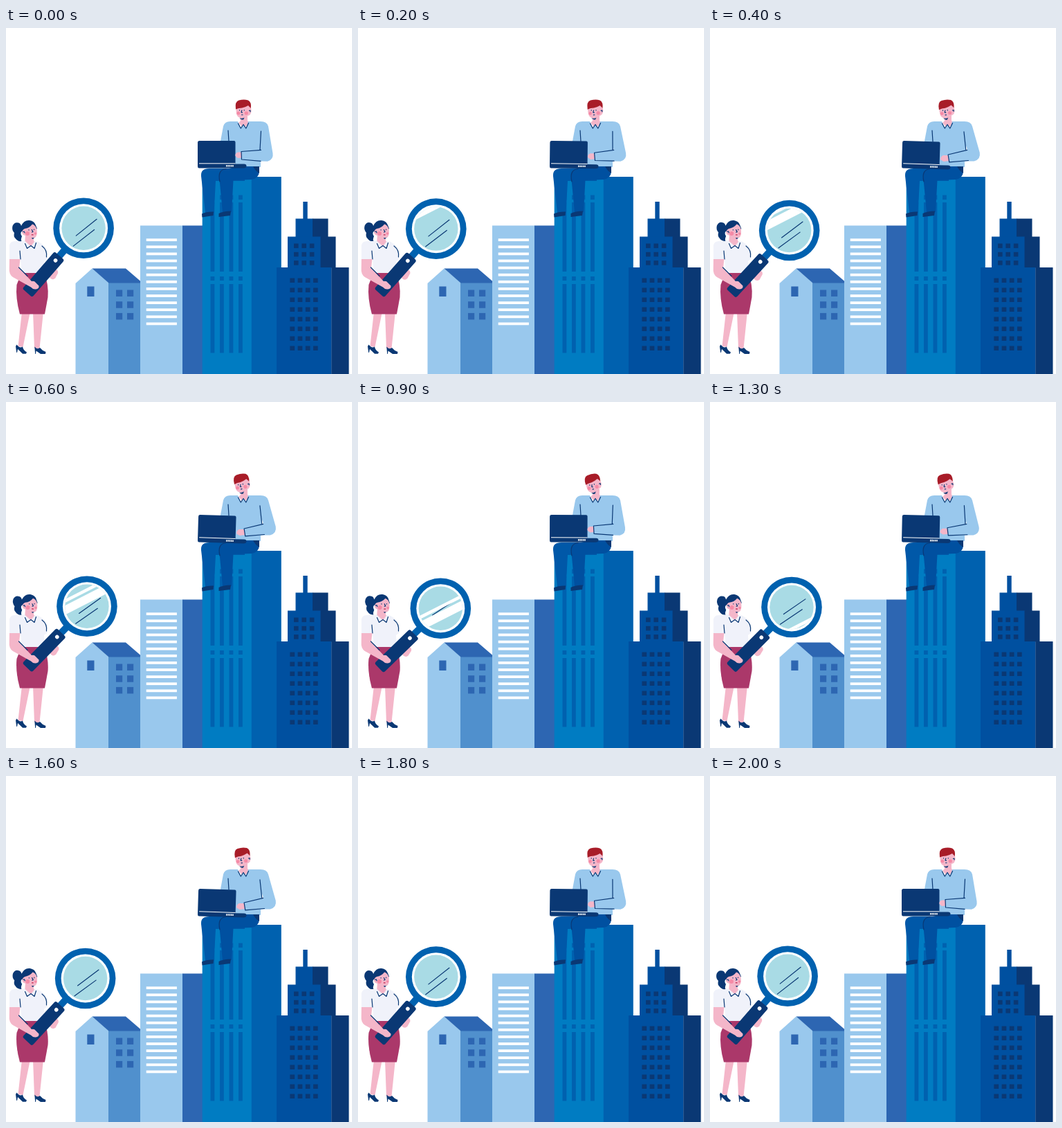
Recreate the animation shown at these times as an HTML page. Size 500 by 500 pixels, loop 6.1 s.

```html
<!DOCTYPE html>
<html lang="en">
<head>
<meta charset="utf-8">
<title>City search</title>
<style>
  html, body { margin: 0; width: 100%; height: 100%; overflow: hidden; background: #fff; }
  svg { display: block; width: 100vw; height: 100vh; }
  .navy { fill: #0a3874 } .deep { fill: #0050a0 } .blue { fill: #0061af } .azure { fill: #007cc2 }
  .mid { fill: #2d66b2 } .side { fill: #5090cd } .sky { fill: #99c8ed } .white { fill: #fff }
  .skin { fill: #f4b6c9 } .blush { fill: #f58aa6 } .line { fill: none; stroke: #0a3874; stroke-width: 1.2; stroke-linecap: round; stroke-linejoin: round }
</style>
</head>
<body>
<svg viewBox="0 0 500 500">
  <defs><clipPath id="lens"><circle r="31.7"/></clipPath></defs>
  <g id="city"></g>

  <g id="man">
    <path class="skin" d="M338 126H349V134L352 137L343 145L336 137L339 134Z"/>
    <path class="sky" d="M309.500 166L314 142Q316 135 324 135H335L339 144.500L343 139L347 144.500L350 135H368Q377 135 379 142L368 180V201H322V166Z"/>
    <path class="line" d="M335.500 138L339.300 145L343 139.500L346.800 145L350.500 137.500M321 148L322 164"/>
    <path fill="#0058a8" d="M345 203H294Q281 203 282 214L288 267H300.500L303 221H345Z"/>
    <path class="deep" d="M366 200H335L322 203Q307 204 308 214L313 266H326L328.500 220L355 219Q365.500 217 366 207Z"/>
    <path class="line" d="M309 222Q305 205 318 203.500"/>
    <path class="navy" d="M357 200H366V210Q360 206 357 200ZM283 268.500Q290 265 300 265.500L299.500 271L283.500 273.500ZM307.500 268Q314 264.500 325 264.500L324 271L307.500 273Z"/>
    <g id="manHead">
      <path class="skin" d="M332.500 114Q332 125 335 128Q339 131.500 344 130.500L349 127Q354.500 126 354.500 119Q354 112 349 109H336Z"/>
      <path fill="#a81c28" d="M332 117.500Q330.500 106 336.500 104.500Q344 102.500 350 104.500Q355 107 353.800 116L350 112Q346 114.500 341 115.500Q336 115.500 332 117.500Z"/>
      <path class="navy" d="M337.500 130Q341 131.500 344.500 129.500L343 132.500Q339.500 133 337.500 130Z"/>
      <circle class="blush" cx="335.800" cy="123.200" r="2.400"/><circle class="blush" cx="347.300" cy="123" r="2.600"/>
      <path class="line" stroke-width="1" d="M337.500 118.500V119M344.300 118.500V119M340.800 119L340 122L341.500 122.300M340.600 125.500H342M351.500 119.500Q353.800 118.500 353 121"/>
    </g>
    <g id="laptop">
      <path class="navy" d="M279.500 163H329.500Q331.500 163 331.500 165V196.500H344Q347.500 196.500 347.500 199.500Q347.500 202.500 343 202.500H279Q277 202.500 277 200V165.500Q277 163 279.500 163Z"/>
      <path stroke="#fff" d="M279 195.800H331.500"/>
      <path stroke="#fff" stroke-width="2.600" stroke-dasharray="1.500 .8" d="M318 199.200H329.500"/>
    </g>
    <path id="palm" class="skin"/>
    <path id="sleeve" class="sky"/>
    <path id="seam" class="line"/>
  </g>

  <g id="woman">
    <path class="skin" d="M23 410H35L24.500 461L17.500 460ZM39 410H54L48.500 463H41Z"/>
    <path class="navy" d="M15.500 457.500Q20 463.500 24 460.500Q25 466 30 468.500L29 470.800H24L17 464L16 469H15.200L14 460ZM41.300 460.500Q45 465 49 462Q52 466 57.500 468L57 471H50L43.500 466.500L43 471H42.200Z"/>
    <path fill="#ab386a" d="M23 352H55Q62 372 60.500 389L56 413.500H20Q13.500 390 15.500 371Z"/>
    <path class="skin" d="M28 299H40V307L43 312L36 320L27 312Z"/>
    <path fill="#f0f2fa" d="M5 334V314Q6 308 13 308L27 307.500L36 315.500L42 307.500Q53 310 56 318L60 333L55 337L56 354H23L21 334Z"/>
    <path class="line" d="M27.500 311.500L30.500 318.500L36 314.500L41 318.500L43.500 310.500M20 322L21 334M52 315Q60 321 58.500 331"/>
    <path class="navy" d="M37 302H42L39 305Q37 305 37 302Z"/>
    <g id="womanHead">
      <path class="navy" d="M22 286Q26 277 34 278Q41 279 43 285L45 290L30 297L22.500 294Q20 297 23 301Q21 306 22.500 308Q17 309 13.500 304Q10.500 301 12 296Q8 292 9.500 286Q12 280 18 281.500Q21 282 22 286Z"/>
      <path class="skin" d="M27 290Q34 289 38 283.500Q43 285 44.500 291Q45.500 299 43 302Q39 304.500 34 302L28 300Q23 299 23 295Q24 291 27 290Z"/>
      <circle class="blush" cx="31" cy="297" r="3"/><circle class="blush" cx="42.500" cy="297" r="1.800"/>
      <path class="line" stroke-width="1" d="M33 291.500V292M40.500 291V291.500M37.300 291.500L39 294.500L37.500 295M24.800 294.500Q26.500 293 27 296"/>
      <path stroke="#c3274f" stroke-width="1.300" d="M36.800 298.800H39.600"/>
      <circle cx="25" cy="301.500" r="2" class="white"/>
    </g>
  </g>

  <g id="glass">
    <g id="stick">
      <path class="skin" d="M7 72Q12 69 14.500 73L16.500 81Q16 87 10 86L7 84Z"/>
      <rect class="blue" x="-5" y="40" width="10" height="15"/>
      <rect class="navy" x="-9.500" y="53" width="19" height="71" rx="3"/>
      <circle class="white" cy="61.800" r="2.800"/>
    </g>
    <circle class="blue" r="43.800"/>
    <circle class="white" r="35"/>
    <circle fill="#a9dbe5" r="31.700"/>
    <path id="marks" class="line" d="M-10.800 10.800L19 -13M-14.800 25.800L15.500 2.200"/>
    <g clip-path="url(#lens)"><path id="gleam" class="white" d="M-40 0H40V-12H-40ZM-40 -15.500H40V-20H-40Z"/></g>
  </g>

  <g id="frontArm">
    <path class="skin" d="M5 334H20.500L19 347L37 366Q41 365 43 368L47.500 372.500Q48 377 43 377.500Q39 378 36 374.500L10 360Q4 356 4.800 347Z"/>
    <path class="line" d="M18.500 346L31 358.500"/>
  </g>
</svg>
<script>
const $ = id => document.getElementById(id);
const box = (color, x, y, w, h) => `<rect class="${color}" x="${x}" y="${y}" width="${w}" height="${h}"/>`;
const poly = (color, points) => `<polygon class="${color}" points="${points}"/>`;

function grid(color, x, y, w, h, cols, rows, dx, dy) {
  let out = "";
  for (let r = 0; r < rows; r++)
    for (let c = 0; c < cols; c++) out += box(color, x + c * dx, y + r * dy, w, h);
  return out;
}

$("city").innerHTML = [
  // house
  poly("sky", "100.500,369 124.500,347.500 149,368 149,500 100.500,500"),
  box("side", 148, 366, 47, 134),
  poly("mid", "124.500,347.500 173,347.500 194.500,366 194.500,368.500 148.500,368.500"),
  box("mid", 117.3, 373.5, 10.2, 14.5),
  grid("mid", 159, 378.5, 9.2, 9.5, 2, 3, 16, 16.7),
  // striped block
  box("sky", 194, 285.5, 61.5, 214.5),
  box("mid", 255, 285.5, 29, 214.5),
  grid("white", 202.7, 304.3, 44.2, 3.8, 1, 13, 0, 10.1),
  // tower
  box("azure", 283.7, 215, 71.3, 285),
  box("blue", 354.8, 215, 43, 285),
  grid("blue", 295.5, 241.5, 5.8, 6.5, 4, 1, 13.5, 0),
  grid("blue", 295.5, 252, 5.8, 100, 4, 1, 13.5, 0),
  grid("blue", 295.5, 359, 5.8, 6, 4, 1, 13.5, 0),
  grid("blue", 295.5, 370, 5.8, 99.5, 4, 1, 13.5, 0),
  // stepped block
  box("deep", 429.3, 251, 6.4, 26),
  box("deep", 418.5, 275.5, 25, 27),
  box("navy", 443, 275.5, 22.5, 27),
  box("deep", 407, 301.5, 48, 45),
  box("navy", 454.5, 301.5, 22, 45),
  box("deep", 391, 346, 79.5, 154),
  box("navy", 470.3, 346, 25.2, 154),
  grid("navy", 416, 311.5, 6.6, 6.6, 3, 3, 11.4, 12.3),
  grid("navy", 410.4, 361.5, 6.7, 6.5, 4, 8, 11.2, 14)
].join("");

const LOOP = 6100, STEP = 100, MOVE = 2000;
const swing = turns => (1 - Math.cos(2 * Math.PI * turns)) / 2;
const turn = (id, deg, x, y) => $(id).setAttribute("transform", `rotate(${deg} ${x} ${y})`);

function draw(ms) {
  const t = Math.min(Math.floor(ms % LOOP / STEP) * STEP, MOVE) / 1000;
  const slow = swing(t / 2), fast = swing(t);
  const pt = (x, y, dx, dy) => `${x + dx * fast} ${y + dy * fast}`;

  turn("manHead", -11 * slow, 343, 134);
  turn("womanHead", 3.5 * slow, 33, 308);
  turn("laptop", 1.9 * fast, 277, 201);

  const cuffTop = pt(340, 178.5, 4.5, 5), cuffEnd = pt(340.5, 190, 5.8, 4.3);
  const bend = pt(368.5, 176.3, 3.5, 0);
  $("sleeve").setAttribute("d", `M366 141L379 142L${pt(385.5, 181, 4.7, -1)}Q${pt(387, 190, 5, 0)} ${pt(378, 192.8, 4, -.4)}` +
    `L${pt(368, 192.6, 4, 0)}L${cuffEnd}L${cuffTop}L${bend}Z`);
  $("seam").setAttribute("d", `M${pt(368.5, 149, -1.7, 1)}L${pt(367, 176, 3, 0)}` +
    `M${bend}L${cuffTop}L${cuffEnd}L${pt(368, 192.4, 6, -1)}`);
  $("palm").setAttribute("d", `M${pt(341, 179.5, 4.5, 5)}L${pt(335, 179.5, 2, 5)}Q${pt(330.5, 181, 2, 6)} ${pt(331.5, 185, 2, 6)}` +
    `L${pt(335, 188, 3, 5.5)}L${pt(341, 187.5, 5, 5)}Z`);

  $("glass").setAttribute("transform", `translate(${112.1 + 7.4 * slow} ${289.3 + 9.1 * slow})`);
  turn("stick", 41 + 5 * slow, 0, 0);
  turn("marks", 5 * slow, 0, 0);
  const sweep = -34 + 42 * t + 15 * t * t;
  $("gleam").setAttribute("transform", `rotate(-27) translate(0 ${sweep})`);
}

const start = performance.now();
function tick() {
  draw(performance.now() - start);
  requestAnimationFrame(tick);
}
tick();
</script>
</body>
</html>
```
